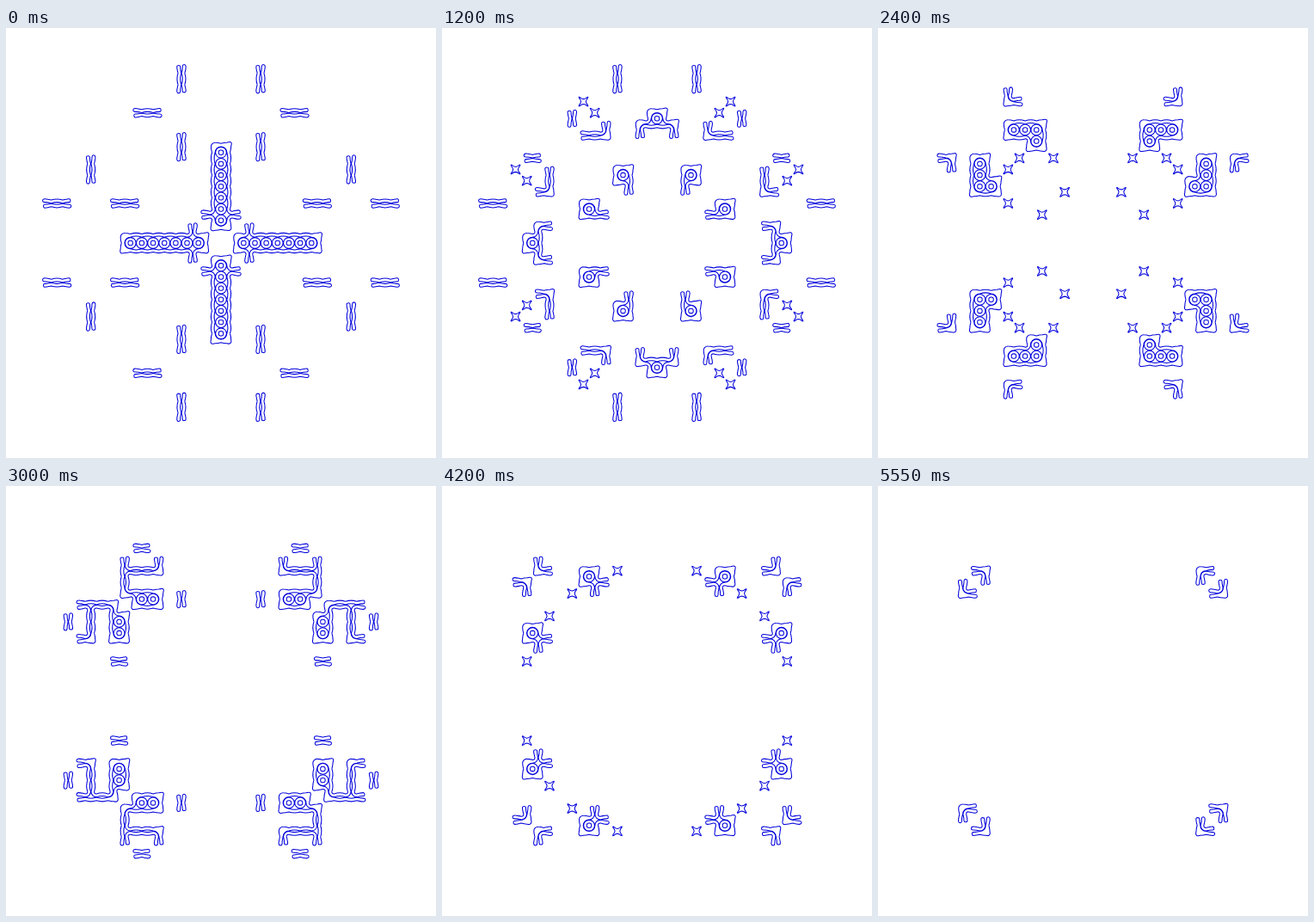
Animation of 500x500 px, one loop 6300 ms. Source, as an HTML page with a canvas:

```html
<!DOCTYPE html>
<html lang="en">
<head>
<meta charset="utf-8">
<title>Life in outlines</title>
<style>
  html, body { margin: 0; width: 100%; height: 100%; overflow: hidden; background: #fff; }
  canvas { display: block; width: 500px; height: 500px; }
</style>
</head>
<body>
<canvas id="stage" width="500" height="500"></canvas>
<script>
const N = 38, SIZE = 500, PITCH = SIZE / N;
const STEP = 150, LAST = 37, LOOP = 6300;
const E = PITCH / 2;   // half a cell
const OUT = 3.9;       // strip edges where they cross a cell border
const IN = 0.2;
const ctx = document.getElementById('stage').getContext('2d');

// Cells are addressed by distance from the centre and mirrored eightfold.
function seed() {
  const grid = new Uint8Array(N * N);
  const put = (a, b) => {
    for (const [p, q] of [[a, b], [b, a]])
      for (const x of [18 + p, 19 - p])
        for (const y of [18 + q, 19 - q]) grid[y * N + x] = 1;
  };
  for (let b = 2; b <= 9; b++) put(1, b);
  put(2, 3);
  for (let d = -1; d <= 1; d++) {
    put(4, 9 + d);
    put(4, 15 + d);
    put(7 + d, 12);
  }
  return grid;
}

const at = (g, x, y) => x >= 0 && y >= 0 && x < N && y < N ? g[y * N + x] : 0;

function evolve(g) {
  return g.map((live, i) => {
    const x = i % N, y = (i - x) / N;
    let sum = -live;
    for (let dy = -1; dy <= 1; dy++)
      for (let dx = -1; dx <= 1; dx++) sum += at(g, x + dx, y + dy);
    return sum === 3 || (live && sum === 2) ? 1 : 0;
  });
}

// One blunt arm of a lone cell, half a hollow on each side.
function arm() {
  ctx.moveTo(2.9, 0);
  ctx.quadraticCurveTo(3, 2, 5, 4.2);
  ctx.quadraticCurveTo(6, 6, 4.2, 5);
  ctx.quadraticCurveTo(2, 3, 0, 2.9);
}

// Two fingers coming in from the right, the clockwise one longer.
function fingers() {
  for (const s of [-1, 1]) {
    const tip = s < 0 ? -4.2 : -2.9;
    ctx.moveTo(E, s * OUT);
    ctx.bezierCurveTo(3, s * 4.6, 1, s * 5.4, -1.4, s * 5.2);
    ctx.bezierCurveTo(tip, s * 4.9, tip, s * 1.4, -1.4, s * 1.3);
    ctx.quadraticCurveTo(2, s * 1.4, E, s * IN);
  }
}

// Strip along a closed right side.
function side() {
  ctx.moveTo(OUT, -E);
  ctx.bezierCurveTo(OUT + 1.4, -2.5, OUT + 1.4, 2.5, OUT, E);
  ctx.moveTo(IN, -E);
  ctx.bezierCurveTo(1.6, -2.5, 1.6, 2.5, IN, E);
}

// Quarter ring around the lower right vertex.
function ring() {
  ctx.moveTo(E, OUT);
  ctx.quadraticCurveTo(OUT - 0.2, OUT - 0.2, OUT, E);
  ctx.moveTo(E, IN);
  ctx.arc(E, E, E - IN, -Math.PI / 2, Math.PI, true);
}

// Outer bend of a corner open to the right and below: [reach, radius] for TL, TR, BR, BL.
const BENDS = [[5.2, 4.8], [6.1, 1.8], [5.7, 2.8], [5.9, 2.4]];
function bend(k) {
  const [reach, r] = BENDS[k];
  ctx.moveTo(E, -OUT);
  ctx.quadraticCurveTo(3, -5, 0, -5);
  ctx.arcTo(-reach, -reach, -5, 0, r);
  ctx.lineTo(-5, 0);
  ctx.quadraticCurveTo(-5, 3, -OUT, E);
  ctx.moveTo(E, -IN);
  ctx.arc(E, E, E + IN, -Math.PI / 2, Math.PI, true);
}

function cell(g, x, y) {
  const open = [at(g, x + 1, y), at(g, x, y + 1), at(g, x - 1, y), at(g, x, y - 1)];
  const links = open[0] + open[1] + open[2] + open[3];
  ctx.save();
  ctx.translate((x + 0.5) * PITCH, (y + 0.5) * PITCH);
  for (let k = 0; k < 4; k++) {
    const here = open[k], next = open[(k + 1) % 4], prev = open[(k + 3) % 4];
    if (!links) arm();
    if (links === 1 && here) fingers();
    if (!here && next && prev) side();
    if (here && next) {
      ring();
      if (links === 2) bend(k);
    }
    ctx.rotate(Math.PI / 2);
  }
  ctx.restore();
}

function draw(g) {
  ctx.fillStyle = '#fff';
  ctx.fillRect(0, 0, SIZE, SIZE);
  ctx.strokeStyle = '#0000dc';
  ctx.lineWidth = 1.05;
  ctx.lineJoin = 'round';
  ctx.beginPath();
  g.forEach((live, i) => { if (live) cell(g, i % N, Math.floor(i / N)); });
  ctx.stroke();
}

const gens = [seed()];
while (gens.length <= LAST) gens.push(evolve(gens[gens.length - 1]));

const start = performance.now();
let shown = -1;
function tick() {
  const t = (performance.now() - start) % LOOP;
  const n = Math.min(LAST, Math.floor(t / STEP));
  if (n !== shown) draw(gens[shown = n]);
  requestAnimationFrame(tick);
}
tick();
</script>
</body>
</html>
```
